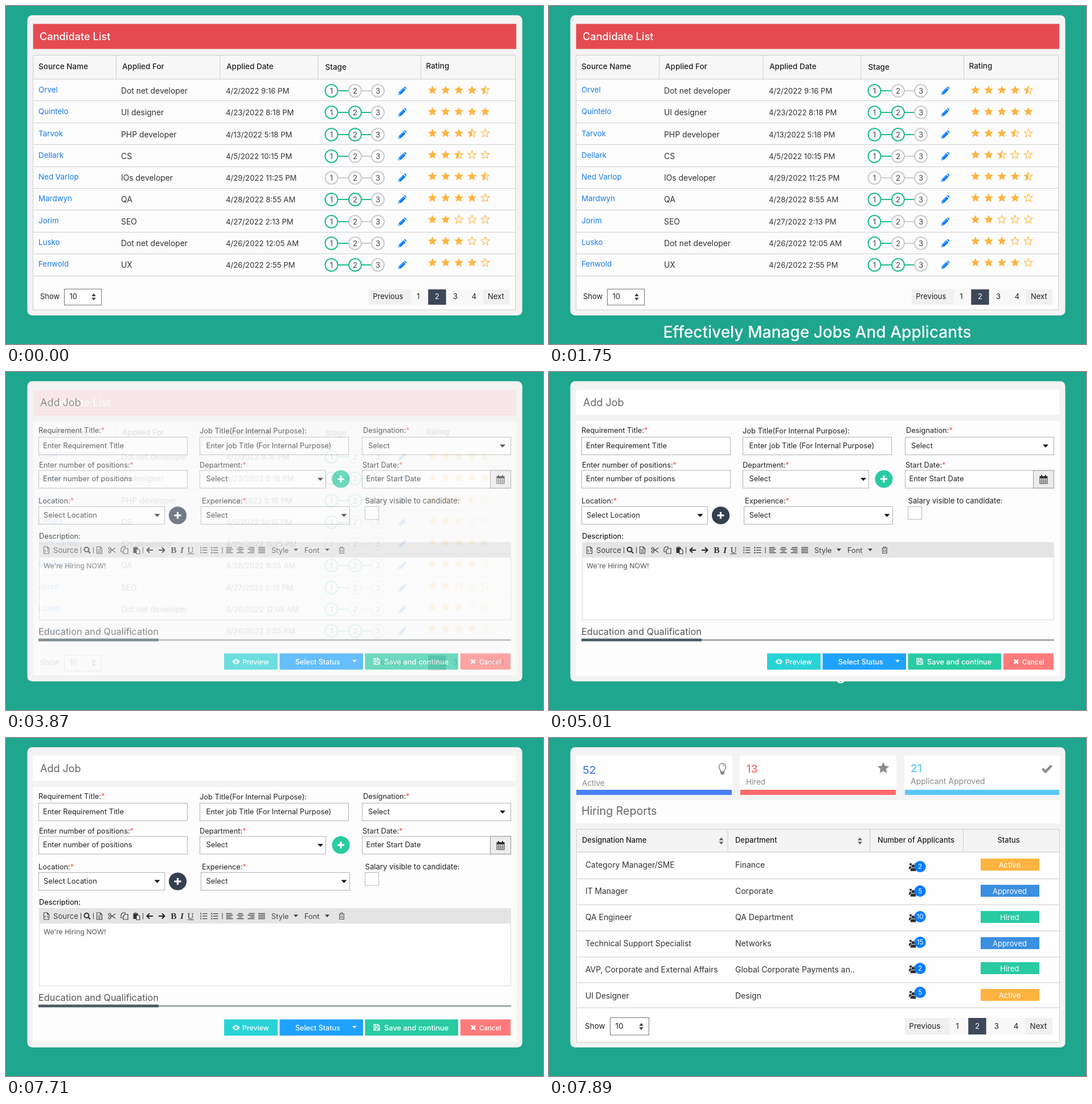
An HTML page for the animation above (8000 ms loop, 943x594 px).

```html
<!DOCTYPE html>
<html lang="en">
<head>
<meta charset="utf-8">
<title>Hiring dashboard</title>
<style>
html, body { margin: 0; width: 100%; height: 100%; overflow: hidden; background: #1fa68e; }
svg { display: block; width: 943px; height: 594px; }
text { font-family: Inter, "Open Sans", sans-serif; font-optical-sizing: none; white-space: pre; }
.serif { font-family: "Liberation Serif", "Noto Serif", serif; }
</style>
</head>
<body>
<svg id="stage" viewBox="0 0 943 594" xmlns="http://www.w3.org/2000/svg">
  <rect width="943" height="594" fill="#1fa68e"/>
  <g id="captionA"></g>
  <g id="captionB"></g>
  <rect x="37.4" y="16.2" width="869.2" height="527.6" rx="8.5" fill="#f3f3f3"/>
  <g id="list"></g>
  <g id="form"></g>
  <g id="reports"></g>
</svg>
<script>
const LOOP = 8000;
const GREEN = '#1fbd8d', MINT = '#29cba3', GOLD = '#ffb340', BLUE = '#007bff', NAVY = '#3c4858';
const $ = id => document.getElementById(id);

// ---- drawing helpers: boxes are given by their edges ----
const rect = (x1, y1, x2, y2, fill, stroke) =>
  `<rect x="${x1}" y="${y1}" width="${x2 - x1}" height="${y2 - y1}" fill="${fill}"${stroke ? ` stroke="${stroke}"` : ''}/>`;
const text = (x, y, s, size = 12.85, fill = '#222', attrs = '') =>
  `<text x="${x}" y="${y}" font-size="${size}" fill="${fill}" ${attrs}>${s}</text>`;
const path = (d, fill, stroke, w = 1) =>
  `<path d="${d}" fill="${fill || 'none'}"${stroke ? ` stroke="${stroke}" stroke-width="${w}"` : ''}/>`;
const line = (x1, y1, x2, y2, stroke, w = 1) => path(`M${x1} ${y1}L${x2} ${y2}`, '', stroke, w);
const disc = (x, y, r, fill, stroke, w = 1) =>
  `<circle cx="${x}" cy="${y}" r="${r}" fill="${fill}"${stroke ? ` stroke="${stroke}" stroke-width="${w}"` : ''}/>`;
const at = (x, y, s) => `<g transform="translate(${x} ${y})">${s}</g>`;
const MID = 'text-anchor="middle"', BOLD = 'font-weight="500"';

const caret = (x, y, fill = '#111', w = 5) => path(`M${x - w} ${y - 2.5}h${2 * w}l${-w} ${w + .3}z`, fill);
const sorter = (x, y, fill = '#555', w = 4) =>
  path(`M${x - w} ${y - 1.2}h${2 * w}l${-w} -5zM${x - w} ${y + 1.2}h${2 * w}l${-w} 5z`, fill);

function starPoints(x, y, r) {
  return Array.from({ length: 10 }, (_, i) => {
    const a = (i / 5 - .5) * Math.PI, q = i % 2 ? r * .46 : r;
    return (x + q * Math.cos(a)).toFixed(2) + ',' + (y + q * Math.sin(a)).toFixed(2);
  });
}
function star(x, y, r, level, color) {
  const pts = starPoints(x, y, level === 1 ? r : r - .6);
  const poly = (p, attrs) => `<polygon points="${p.join(' ')}" ${attrs}/>`;
  if (level === 1) return poly(pts, `fill="${color}"`);
  const outline = poly(pts, `fill="none" stroke="${color}" stroke-width="1.1"`);
  return outline + (level ? poly([...pts.slice(5), pts[0]], `fill="${color}"`) : '');
}

function footer(f) {
  const { y, size, show, box, nums, prev, next, top, bottom } = f;
  const n = (x, s, c) => text(x, y, s, size, c, MID);
  return text(show, y, 'Show', size) +
    rect(box[0], box[1], box[2], box[3], '#fff', '#777') +
    text(box[0] + 9, y, '10', size) + sorter(box[2] - 13.5, y - 4, '#444', 3.8) +
    rect(prev[0], top, next[1], bottom, '#f8f8f8') +
    rect(prev[0], top, prev[1], bottom, '#f0f0f0') +
    rect(next[0], top, next[1], bottom, '#f0f0f0') +
    rect(nums[1] - 15.7, top, nums[1] + 15.7, bottom, NAVY) +
    text(prev[0] + 7.3, y, 'Previous', size) + text(next[0] + 8, y, 'Next', size) +
    nums.map((x, i) => n(x, i + 1, i === 1 ? '#fff' : '#222')).join('');
}

// ---- candidate list ----
function drawList() {
  const rows = [
    ['Orvel', 'Dot net developer', '4/2/2022 9:16 PM', 1, 4.5],
    ['Quintelo', 'UI designer', '4/23/2022 8:18 PM', 2, 5],
    ['Tarvok', 'PHP developer', '4/13/2022 5:18 PM', 2, 3.5],
    ['Dellark', 'CS', '4/5/2022 10:15 PM', 1, 2.5],
    ['Ned Varlop', 'IOs developer', '4/29/2022 11:25 PM', 0, 4.5],
    ['Mardwyn', 'QA', '4/28/2022 8:55 AM', 2, 4],
    ['Jorim', 'SEO', '4/27/2022 2:13 PM', 1, 2],
    ['Lusko', 'Dot net developer', '4/26/2022 12:05 AM', 1, 3],
    ['Fenwold', 'UX', '4/26/2022 2:55 PM', 2, 4]
  ];
  const heads = [['Source Name', 57, 111], ['Applied For', 204, 111], ['Applied Date', 387, 111],
    ['Stage', 560.5, 112], ['Rating', 737.5, 110]];
  const pencil = path('M-7.2 7.2L-6 2.2L1.8 -5.6L5.6 -1.8L-2.2 6zM2.8 -6.4Q4.4 -8 5.8 -6.6L6.8 -5.6Q7.8 -4.3 6.5 -2.8z', BLUE) +
    line(-4.4, 2.6, 2.2, -4, '#bcdcff', .8) + disc(-5.1, 5.1, .9, '#fff');
  let s = rect(47.6, 31.5, 896, 75.5, '#e54b51') + text(59, 60, 'Candidate List', 18.2, '#fff', BOLD) +
    rect(47.5, 86.5, 894.5, 534, '#fcfcfc', '#cfcfcf') + rect(48, 87, 894, 128, '#f7f7f7');
  for (const x of [193.5, 376, 548, 728.5]) s += line(x, 87, x, 128, '#cfcfcf');
  for (const [t, x, y] of heads) s += text(x, y, t, 13.5, '#222', BOLD);
  for (let i = 0; i < 10; i++) s += line(48, Math.round(128 + 38.4 * i) + .5, 894, Math.round(128 + 38.4 * i) + .5, '#cfcfcf');
  rows.forEach(([name, role, date, stage, rating], i) => {
    const y = Math.round(149 + 38.25 * i);
    const tone = on => on ? GREEN : '#cbcbcb';
    s += text(57, y + 3, name, 13.4, '#1a7bea') + text(202, y + 5, role, 13.9, '#333') +
      text(386, y + 5, date, 13.15, '#333') +
      line(583, y, 602, y, tone(stage > 0), 2) + line(624, y, 642, y, tone(stage > 1), 2);
    [571.5, 613, 653].forEach((x, k) => {
      s += disc(x, y, 11, '#fdfdfd', tone(stage > k), 2) + text(x, y + 4.8, k + 1, 13.2, '#444', MID);
    });
    s += at(696, y, pencil);
    for (let k = 0; k < 5; k++)
      s += star(748.8 + 23.2 * k, 148 + 37.9 * i, 8.2, Math.max(0, Math.min(1, rating - k)), GOLD);
  });
  return s + footer({ y: 515.3, size: 13, show: 60, box: [102.5, 497.5, 167.5, 525.5],
    prev: [637, 711], next: [838, 884], nums: [724, 757, 789, 822], top: 498, bottom: 525 });
}

// ---- job form ----
function toolbar() {
  const c = '#444', y = 313;
  const bars = (x, rows) => rows.map(([a, b], i) => line(x + a, y - 4.5 + 3 * i, x + b, y - 4.5 + 3 * i, c, 1.4)).join('');
  const page = path('M-4.5 -6h6l3 3v9h-9zM1.5 -6v3h3', '', c, 1.1);
  const arrow = path('M6 0H-4M0 -4.5L-4.5 0L0 4.5', '', '#222', 2);
  let s = at(71, y, page + path('M-1 -1l-2 2l2 2M1 -1l2 2l-2 2', '', c)) + text(83, 317.7, 'Source', 13.1, c);
  for (const x of [131.5, 153.5, 240.5, 380]) s += line(x, 307.5, x, 318.5, '#555', 1.2);
  s += disc(141.5, 312, 4, 'none', '#333', 2) + line(144.5, 315, 148, 318.5, '#333', 2.2) +
    at(164, y, page + path('M-2.5 -1h5M-2.5 1.5h5M-2.5 4h5', '', c)) +
    at(186, y, disc(-4, -3, 2, 'none', c, 1.2) + disc(-4, 3, 2, 'none', c, 1.2) + path('M-2.5 -2L6 4M-2.5 2L6 -4', '', c, 1.3)) +
    at(208, y, path('M-6 -3l3 -3h4v3M-6 -3v6h4M-2 0l3 -3h5v9h-8z', '', c, 1.2)) +
    at(229, y, rect(-5.5, -5, 2.5, 5, '#333') + rect(-3.5, -6.5, .5, -4, '#777') + path('M0 -1.5h4l2 2v6h-6z', '#eee', '#333', 1.1)) +
    at(252, y, arrow) + at(274, y, `<g transform="scale(-1 1)">${arrow}</g>`);
  const serif = (x, t, extra) => text(x, 318, t, 15.5, '#333', `class="serif" ${MID} ${extra}`);
  s += serif(294.5, 'B', 'font-weight="700"') + serif(309, 'I', 'font-weight="700" font-style="italic"') +
    serif(324, 'U', '') + line(318.5, 319.5, 329.5, 319.5, c);
  for (const x of [347.5, 366.5]) for (let i = 0; i < 3; i++) {
    const v = y - 4.3 + 4.4 * i;
    s += line(x - 2.5, v, x + 6, v, c, 1.3) + (x < 360 ? line(x - 5.3, v - 1.6, x - 5.3, v + 1.6, c, 1.2) : disc(x - 5.2, v, 1.2, c));
  }
  s += bars(392.5, [[-6, 4], [-6, 6], [-6, 3], [-6, 6]]) + bars(411.5, [[-4, 4], [-6, 6], [-3, 3], [-6, 6]]) +
    bars(430.5, [[-4, 6], [-6, 6], [-2, 6], [-6, 6]]) + bars(449, [[-6, 6], [-6, 6], [-6, 6], [-6, 6]]);
  return s + text(466, 317.7, 'Style', 12.8, c) + caret(509, y, '#333', 4) +
    text(524, 317.7, 'Font', 12.8, c) + caret(564, y, '#333', 4) +
    at(589.5, y, path('M-5 -3.5H5M-2 -3.5v-2h4v2M-3.8 -3.5v9h7.6v-9M-1.4 -1v4.5M1.4 -1v4.5', '', '#555', 1.1));
}

function drawForm() {
  const label = (x, y, t, star = true, size = 12.8) =>
    text(x, y, t + (star ? '<tspan fill="#ff5050">*</tspan>' : ''), size);
  const field = (x1, y1, x2, t, tx, arrow) => rect(x1, y1, x2, y1 + 31, '#fff', '#b0b0b0') +
    text(tx, y1 + 19, t, 12.85) + (arrow ? caret(arrow, y1 + 15.5) : '');
  const plus = (x, y, fill) => disc(x, y, 15.6, fill) + path(`M${x - 6} ${y}h12M${x} ${y - 6}v12`, '', '#fff', 3.2);
  const button = (x1, x2, fill, tx, t, size) =>
    rect(x1, 494.5, x2, 523, fill) + text(tx, 513.7, t, size, '#fff', BOLD);

  let s = rect(47, 31, 896, 75, '#fefefe') + text(60, 59.7, 'Add Job', 18, '#666') +
    rect(47, 86, 897, 534, '#fdfdfd') +
    label(57, 107.3, 'Requirement Title:') + field(57.5, 114.5, 318.5, 'Enter Requirement Title', 65) +
    label(340, 108, 'Job Title(For Internal Purpose):', false) +
    field(340.5, 114.5, 601.5, 'Enter job Title (For Internal Purpose)', 351.5) +
    label(627, 107.3, 'Designation:') + field(625.5, 114.5, 886.5, 'Select', 636, 872) +
    label(58, 167.5, 'Enter number of positions:') + field(57.5, 173, 318.5, 'Enter number of positions', 65) +
    label(340, 167.5, 'Department:') + field(340.5, 173, 561.5, 'Select', 351.5, 552) + plus(588, 188, MINT) +
    label(626, 167.5, 'Start Date:') + field(625.5, 173, 886.5, 'Enter Start Date', 632.5) +
    label(57, 231, 'Location:') + field(57.5, 236.5, 278.5, 'Select Location', 66, 265.5) + plus(301.5, 252, '#344050') +
    label(344, 231, 'Experience:') + field(342.5, 236.5, 603.5, 'Select', 351.5, 593.5) +
    label(630.5, 231, 'Salary visible to candidate:', false, 13.1) + rect(630.5, 236.5, 654.5, 259, '#fff', '#b5b5b5');

  s += rect(850.5, 173, 886.5, 204, '#ececec', '#999') + at(868.5, 189,
    rect(-6.5, -5.5, 6.5, 7, 'none', '#333') + rect(-6.5, -5.5, 6.5, -2, '#333') +
    path('M-3.5 -8v3.5M3.5 -8v3.5', '', '#333', 2) +
    path('M-6 1h12M-6 4h12M-3.2 -2v9M0 -2v9M3.2 -2v9', '', '#444', .8));

  s += text(58, 292.7, 'Description:', 12.8, '#000') +
    rect(58.5, 299.5, 886.5, 435.5, '#fefefe', '#dcdcdc') + rect(58, 299, 887, 326, '#e4e4e4') + toolbar() +
    text(66, 345.3, 'We\'re Hiring NOW!', 12.3, '#555') +
    text(57, 462, 'Education and Qualification', 16.3, '#555') +
    line(57, 471, 887, 471, '#5a686e', 1.3) + rect(57, 468.5, 268, 473.3, '#4a5c63');

  s += button(383, 477, '#28d3d6', 415, 'Preview', 12.3) +
    button(480.5, 627, '#1fa2ff', 508, 'Select Status', 12.5) + caret(612, 508.5, '#fff', 4) +
    button(630.5, 794, MINT, 664, 'Save and continue', 12.85) +
    button(798, 886, '#ff7b7b', 831, 'Cancel', 11.6);
  s += at(404, 509, path('M-6.5 0Q0 -9 6.5 0Q0 9 -6.5 0z', '#fff') + disc(0, 0, 2.7, '#28d3d6') + disc(.8, -.8, 1, '#fff')) +
    at(651, 508.5, path('M-5 -5h7.5l2.5 2.5v7.5h-10zM-2.5 -5v3.5h4.5v-3.5M-3 5v-4h6v4', '', '#fff', 1.3)) +
    at(820.5, 509, path('M-3.5 -3.5L3.5 3.5M3.5 -3.5L-3.5 3.5', '', '#fff', 2.8));
  return s;
}

// ---- hiring reports ----
function drawReports() {
  const tones = { Active: GOLD, Approved: '#3a8fe0', Hired: MINT };
  const cards = [
    [48, 321, '#4a80f8', '52', 59, 63, 'Active', 58, 83.5, 13.4],
    [336, 609, '#fb6a69', '13', 346.5, 61, 'Hired', 346, 81.5, 13.4],
    [625, 896, '#5ac8f8', '21', 635, 60, 'Applicant Approved', 635, 80.5, 14]
  ];
  const rows = [
    ['Category Manager/SME', 'Finance', 2, 226, 'Active', 212],
    ['IT Manager', 'Corporate', 5, 269, 'Approved', 258],
    ['QA Engineer', 'QA Department', 10, 314, 'Hired', 304],
    ['Technical Support Specialist', 'Networks', 15, 359, 'Approved', 350],
    ['AVP, Corporate and External Affairs', 'Global Corporate Payments an..', 2, 405, 'Hired', 394],
    ['UI Designer', 'Design', 5, 447, 'Active', 441]
  ];
  const person = (x, y, head, half) => disc(x, y, head, '#2d2d2d', '#fefefe', .8) +
    path(`M${x - half} ${y + 9}v-3q0 -3 3 -3h${2 * half - 6}q3 0 3 3v3z`, '#2d2d2d', '#fefefe', .8);
  const people = person(-4.4, -5, 2.5, 3.4) + person(4.4, -5, 2.5, 3.4) + person(0, -1.8, 3.3, 5.2);
  let s = '';
  for (const [x1, x2, c, n, nx, ny, t, tx, ty, size] of cards)
    s += rect(x1 - 1, 31, x2 + 1, 91, '#fefefe') + rect(x1, 91, x2, 100, c) +
      text(nx, ny, n, 19.3, c, BOLD) + text(tx, ty, t, size, '#8a8a8a');
  s += at(304.5, 54, path('M-3 5C-3 2 -6 0 -6 -3.5A6 6 0 0 1 6 -3.5C6 0 3 2 3 5z', '', '#8a8a8a', 1.6) +
      path('M0 -6.5Q3 -6.5 3.2 -3.5', '', '#8a8a8a', 1.2) + rect(-3.4, 5, 3.4, 9.2, '#8a8a8a') + rect(-1.6, 9, 1.6, 10.6, '#8a8a8a')) +
    star(587, 53, 10.8, 1, '#8a8a8a') + path('M866.5 54L872 59.3L882.3 48.5', '', '#8a8a8a', 4.2) +
    rect(47, 109, 897, 150, '#fdfdfd') + text(57, 135.3, 'Hiring Reports', 19.6, '#666') +
    rect(48.5, 160.5, 896.5, 534.8, '#fefefe', '#cfcfcf') + rect(49, 161, 896, 200, '#f4f4f4');
  for (const x of [314, 563.5, 727.5]) s += line(x, 161, x, 200, '#cfcfcf');
  for (const y of [200.5, 247.5, 293, 339, 385, 430, 474]) s += line(49, y, 896, y, '#cbcbcb', 1.2);
  for (const [t, x] of [['Designation Name', 58], ['Department', 327], ['Number of Applicants', 577], ['Status', 787.5]])
    s += text(x, 184.3, t, 12.95, '#222', BOLD);
  s += sorter(302.5, 181, '#666') + sorter(546, 181, '#666');
  rows.forEach(([job, team, count, cy, status, top], i) => {
    const y = 228 + 45.95 * i;
    s += text(64, y, job, 13.85, '#333') + text(327, y, team, 14, '#333') +
      at(639.5, 227 + 44.9 * i, people) +
      disc(651.7, cy, 10, BLUE) + text(651.7, cy + 4.3, count, 12, '#fff', MID) +
      rect(758, top, 861, top + 21, tones[status]) + text(809, top + 15.5, status, 13.1, '#fff', MID);
  });
  return s + footer({ y: 511, size: 13.5, show: 63, box: [107.5, 491.5, 175.5, 522],
    prev: [625, 704], next: [836.5, 884], nums: [717, 752, 786, 820], top: 492, bottom: 521 });
}

const caption = (x, t, size) => text(x, 582.5, t, size, '#fff', `${MID} ${BOLD}`);
$('captionA').innerHTML = caption(471, 'Effectively Manage Jobs And Applicants', 28.05);
$('captionB').innerHTML = caption(472.5, 'Effortless Hiring Process', 27);
$('list').innerHTML = drawList();
$('form').innerHTML = drawForm();
$('reports').innerHTML = drawReports();

// ---- motion: stepped tables of [time, value] ----
const ramp = (start, gap, n, value) => Array.from({ length: n }, (_, i) => [start + gap * i, value((i + 1) / n)]);
const fadeIn = t => ramp(t + 30, 30, 6, k => k);
const fadeOut = t => ramp(t + 30, 30, 6, k => 1 - k);
const HIDDEN = -48;
const drop = (start, end) => [[0, HIDDEN], ...ramp(start, 100, 8, k => HIDDEN * (1 - k)), [end, HIDDEN]];

function play(id, prop, table, format = v => v) {
  const steps = [...table, [LOOP, table[table.length - 1][1]]];
  $(id).animate(
    steps.map(([t, v]) => ({ offset: t / LOOP, [prop]: format(v), easing: 'step-end' })),
    { duration: LOOP, iterations: Infinity }
  );
}
const shift = v => `translateY(${v}px)`;
play('captionA', 'transform', drop(1050, 3750), shift);
play('captionB', 'transform', drop(5010, 7710), shift);
play('list', 'opacity', [[0, 1], ...fadeOut(3750)]);
play('form', 'opacity', [[0, 0], ...fadeIn(3750), ...fadeOut(7710)]);
play('reports', 'opacity', [[0, 0], ...fadeIn(7710)]);
</script>
</body>
</html>
```
